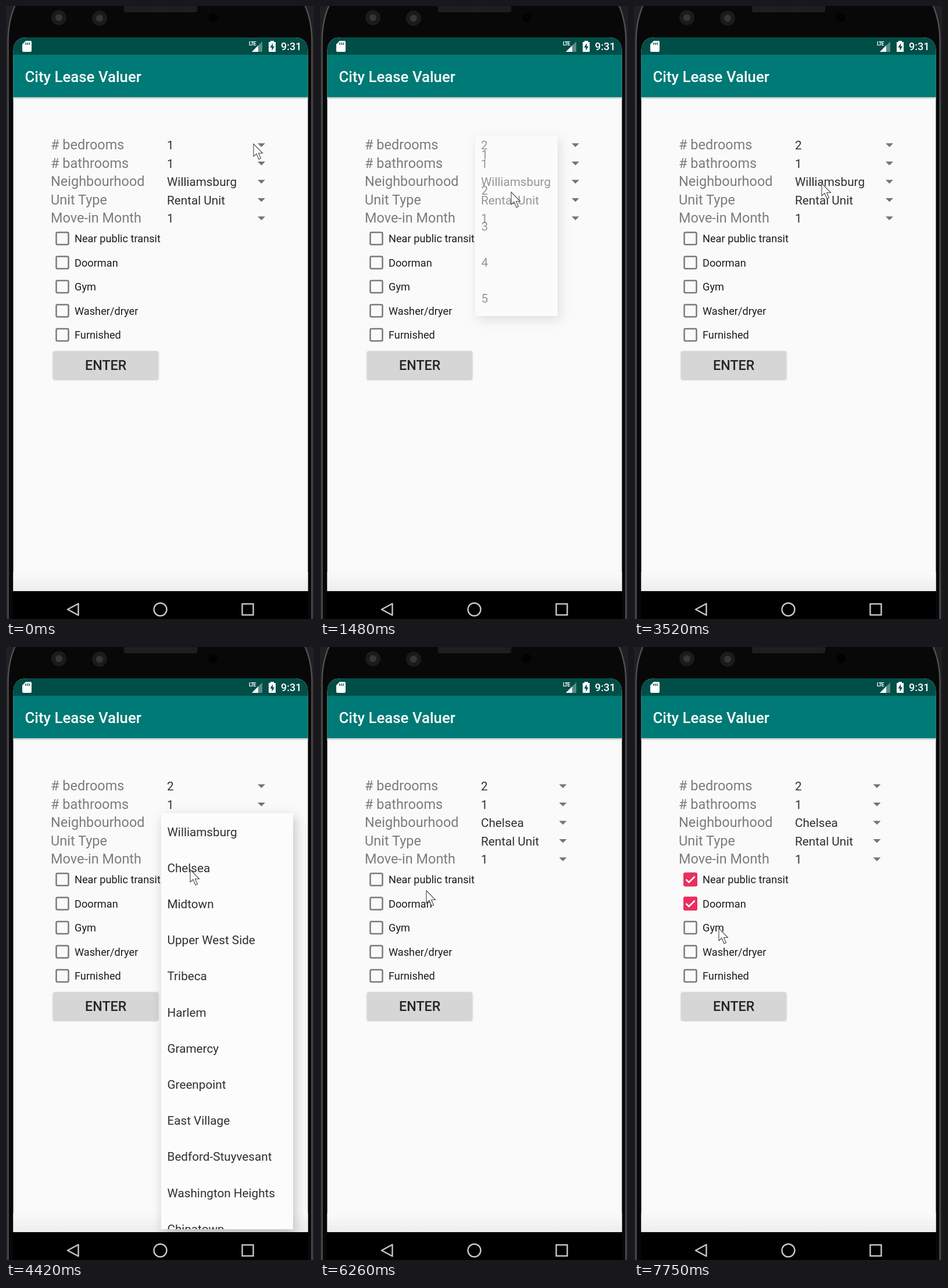
Animation of 530 by 1056 pixels, one loop 8 s. Source, as an HTML page:

```html
<!DOCTYPE html>
<html lang="en">
<head>
<meta charset="utf-8">
<title>City Lease Valuer</title>
<style>
  html, body { margin: 0; width: 100%; height: 100%; overflow: hidden; background: #111; }
  svg { display: block; font-family: Roboto, sans-serif; }
  .label { font-size: 23.5px; fill: #7c7c7c; }
  .value { font-size: 20.7px; fill: #303030; }
  .option { font-size: 18.2px; fill: #1c1c1c; }
  .panel { fill: #fcfcfc; filter: drop-shadow(4px 7px 10px rgba(0, 0, 0, .22)); }
  .button { fill: #d6d6d6; filter: drop-shadow(0 1.5px 1.5px rgba(0, 0, 0, .25)); }
</style>
</head>
<body>
<svg id="stage" width="530" height="1056" viewBox="0 0 530 1056">
  <defs>
    <linearGradient id="floor" x2="0" y2="1">
      <stop offset="0" stop-color="#fafafa"/>
      <stop offset="1" stop-color="#ededed"/>
    </linearGradient>
    <linearGradient id="barShadow" x2="0" y2="1">
      <stop offset="0" stop-color="#b3bcbc"/>
      <stop offset="1" stop-color="#fafafa"/>
    </linearGradient>
    <pattern id="mesh" width="5" height="5" patternUnits="userSpaceOnUse">
      <rect width="5" height="5" fill="#202020"/>
      <path d="M0 0H5M0 0V5" stroke="#151515"/>
    </pattern>
    <clipPath id="screen"><path d="M12.500 1008V78Q12.500 54 36 54H496Q519.500 54 519.500 78V1008Z"/></clipPath>
  </defs>

  <!-- phone body -->
  <rect width="530" height="1056" fill="#202020"/>
  <path d="M3.500 1060V62Q3.500 24 17 -4H513Q526.500 24 526.500 62V1060Z" fill="#080808" stroke="#505050" stroke-width="2.400"/>
  <rect x="203" y="-6" width="126" height="17" rx="4" fill="url(#mesh)"/>
  <g fill="#1b1b1b"><circle cx="91" cy="20" r="13"/><circle cx="161" cy="21" r="13"/></g>
  <g fill="#363636"><circle cx="91" cy="20" r="6"/><circle cx="161" cy="21" r="6"/></g>
  <circle cx="356" cy="20" r="8" fill="#020202"/>

  <!-- screen -->
  <g clip-path="url(#screen)">
    <rect x="12" y="54" width="508" height="954" fill="#fafafa"/>
    <rect x="12" y="975" width="508" height="33" fill="url(#floor)"/>
    <rect x="12" y="54" width="508" height="31" fill="#004e48"/>
    <rect x="12" y="84" width="508" height="73" fill="#007a76"/>
    <rect x="12" y="157" width="508" height="4" fill="url(#barShadow)"/>
  </g>
  <g fill="#fff">
    <path d="M34 60H42Q44 60 44 62V77Q44 79 42 79H30Q28 79 28 77V66Z"/>
    <path d="M34 63V67M37 63V67M40 63V67" stroke="#004e48" stroke-width="1.400"/>
    <text x="418" y="68" font-size="9" font-weight="700" letter-spacing="-1">LTE</text>
    <path d="M441 61V79H423Z" opacity=".35"/>
    <path d="M434 68V79H423Z"/>
    <path d="M455 62V60H461V62H464V79H452V62Z"/>
    <path d="M459 64L454.500 71.500H457.500V77L462 69.500H459Z" fill="#004e48"/>
    <text x="473" y="76" font-size="18" font-weight="500">9:31</text>
    <text x="32.500" y="131" font-size="25.800" font-weight="500">City Lease Valuer</text>
  </g>

  <g id="form"></g>
  <rect class="button" x="81" y="594.500" width="181" height="48.500" rx="3"/>
  <text x="171.700" y="627" font-size="23.300" font-weight="500" text-anchor="middle" fill="#262626">ENTER</text>

  <!-- navigation bar -->
  <rect x="12" y="1008" width="508" height="48"/>
  <g fill="none" stroke="#c8c8c8" stroke-width="2.400">
    <path d="M106 1039.500L124.500 1029.500V1049.500Z" stroke-linejoin="round"/>
    <circle cx="265.500" cy="1039.500" r="11"/>
    <rect x="406.500" y="1030" width="19" height="19"/>
  </g>

  <g id="menus"></g>
  <path id="cursor" d="M.5 .5V22L5.500 17.500L9.500 27L13 25.500L9 16.500H16Z" fill="#fdfdfd" stroke="#484848" stroke-width="1.100"/>
</svg>
<script>
const LOOP = 8000;
const $ = id => document.getElementById(id);
const rowY = i => 239.5 + 31.5 * i;
const optionY = i => 400.5 + 41.5 * i;

const fields = [['# bedrooms', 1], ['# bathrooms', 1], ['Neighbourhood', 'Williamsburg'],
  ['Unit Type', 'Rental Unit'], ['Move-in Month', 1]];
const options = ['Near public transit', 'Doorman', 'Gym', 'Washer/dryer', 'Furnished'];
const places = ['Williamsburg', 'Chelsea', 'Midtown', 'Upper West Side', 'Tribeca', 'Harlem',
  'Gramercy', 'Greenpoint', 'East Village', 'Bedford-Stuyvesant', 'Washington Heights', 'Chinatown'];

// Pointer stops: time, x, y
const stops = [[0, 426, 237], [850, 329, 320], [1700, 341, 329], [1780, 358, 340],
  [1930, 308, 361], [2020, 258, 377], [2480, 323, 305], [3740, 317, 383],
  [4870, 320, 362], [4960, 325, 325], [5100, 328, 298], [5720, 217, 414],
  [6260, 183, 419], [6350, 182, 411], [6520, 174, 403], [6610, 170, 400],
  [6920, 170, 441], [7140, 156, 440], [7350, 155, 450], [7390, 153, 460], [7590, 146, 484]];

$('form').innerHTML = fields.map(([name, value], i) => `
  <text class="label" x="77" y="${rowY(i) + 7.6}">${name}</text>
  <text class="value" id="value${i}" x="277" y="${rowY(i) + 7.6}">${value}</text>`).join('') +
  `<path id="arrows" fill="#757575" d="${fields.map((_, i) => `M-6.5 ${rowY(i) - 3}h13l-6.5 6.5z`).join('')}"/>` +
  options.map((name, i) => `
  <rect x="86.500" y="${optionY(i) - 10.5}" width="21" height="21" rx="2" fill="none" stroke="#7a7a7a" stroke-width="2.500"/>
  <g id="check${i}">
    <rect x="85" y="${optionY(i) - 12}" width="24" height="24" rx="3" fill="#e82f60"/>
    <path d="M89.500 ${optionY(i)}l5 5l10 -10" fill="none" stroke="#fff" stroke-width="2.600"/>
  </g>
  <text class="option" x="118" y="${optionY(i) + 6.8}">${name}</text>`).join('');

const menu = (id, top, width, height, items) => `
  <g id="${id}">
    <rect class="panel" x="267" y="${top}" width="${width}" height="${height}" rx="2"/>
    <svg x="267" y="${top}" width="${width}" height="${height}">
      ${items.map((item, i) => `<text class="value" x="10.500" y="${39.5 + 62.2 * i}">${item}</text>`).join('')}
    </svg>
  </g>`;
$('menus').innerHTML = menu('rooms', 223, 142, 311, [1, 2, 3, 4, 5]) + menu('areas', 286, 227, 717, places);

const fade = (id, opacity) => $(id).setAttribute('opacity', opacity);

function draw(now) {
  const t = now % LOOP;
  const [, x, y] = stops.findLast(stop => stop[0] <= t);
  $('cursor').setAttribute('transform', `translate(${x - 0.5} ${y})`);

  const moved = t >= 4790;
  $('value0').textContent = t >= 1480 ? 2 : 1;
  $('value2').textContent = moved ? 'Chelsea' : 'Williamsburg';
  $('arrows').setAttribute('transform', `translate(${moved ? 418 : 439.5} 0)`);

  fade('rooms', t < 630 || t >= 1570 ? 0 : t < 1480 ? 1 : 0.5);
  fade('areas', t >= 3740 && !moved ? 1 : 0);
  options.forEach((_, i) => fade('check' + i, t >= [6830, 7140][i] ? 1 : 0));
  requestAnimationFrame(draw);
}
draw(0);
</script>
</body>
</html>
```
